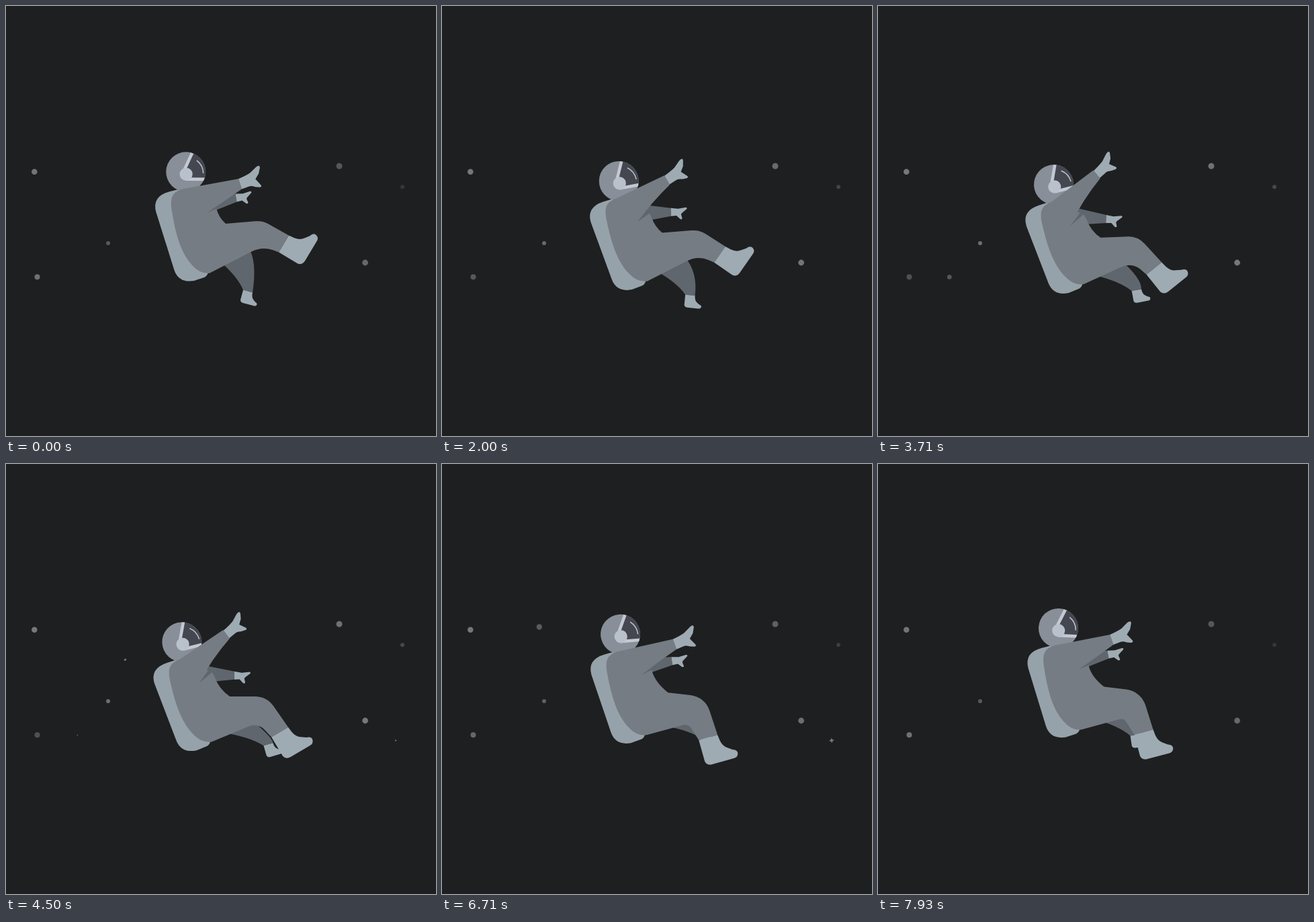
These frames come from a looping animation (640x640 px, 8000 ms). An HTML page with a canvas:

```html
<!DOCTYPE html>
<html lang="en">
<head>
<meta charset="utf-8">
<title>Floating astronaut</title>
<style>
  html, body { margin: 0; width: 100%; height: 100%; overflow: hidden; background: #1e1f20; }
  canvas { display: block; width: 100vw; height: 100vh; }
</style>
</head>
<body>
<canvas id="stage" width="640" height="640"></canvas>
<script>
const ctx = document.getElementById('stage').getContext('2d');
const LOOP = 8000;
const RAD = Math.PI / 180;
const SUIT = '#767c84', DARK = '#60666d', TRIM = '#9eabb3', PACK = '#96a2a9';

const HAND = new Path2D('M0-8Q12-9 19-11L30-16.5Q37-19 35.5-14L31-6 24 0 29 11Q30 14.5 26 13.5L20 11Q15 7 11 7.5L0 8Z');
const SMALL_HAND = new Path2D('M0-6L11-4.5 22-6Q25-6 23.5-3.5L16.5 2 15 4 16.5 10Q16 12 13.5 11L8 5.5 0 6Z');
const BOOT = new Path2D('M0-14.5L9-15.5Q18-17 22-23L27-30Q29.5-37.5 35-36Q40.5-34 40-28.5L40 5Q40 13 33 14.5L0 14.5Z');
const BACKPACK = new Path2D('M258 273L243 277Q217 284 223 307L250.5 393Q257 413 280 409.5L296 404Q301 401 301 396L280 300Z');
const VISOR = new Path2D('M-2 0L10-30 40-30 40 11 0 11Z');
const SPARKLE = new Path2D('M0-1Q.2-.2 1 0Q.2.2 0 1Q-.2.2-1 0Q-.2-.2 0-1Z');

// x, y, radius, opacity, opacity gained while the astronaut sinks
const STARS = [
  [42.3, 246.8, 4.3, 0.38, 0.02], [46.5, 403.3, 4, 0.37, -0.15],
  [152, 353, 3, 0.26, 0.1], [496, 238.3, 4.5, 0.25, 0.12],
  [590, 269.2, 3, 0.11, 0.08], [534.6, 382, 4.4, 0.33, 0.07]
];

const clamp = v => Math.min(1, Math.max(0, v));
const ease = v => { v = clamp(v); return v * v * (3 - 2 * v); };
const pulse = (t, from, to) => Math.sin(Math.PI * clamp((t - from) / (to - from)));
const grey = alpha => `rgba(255,255,255,${alpha})`;
const joint = (x, y, degrees) => ({ x, y, a: degrees * RAD });
const edge = (j, w) => [j.x + Math.sin(j.a) * w, j.y - Math.cos(j.a) * w];

// The body bobs, the arms wave, the back leg swings and the front leg folds once.
function poseAt(t) {
  const sink = 1.7 + 16.4 * Math.cos(2 * Math.PI * (t - 3800) / 14000);
  const raise = Math.cos(Math.PI * (t - 3680) / 7600) ** 2;
  const swing = Math.sin(Math.PI * t / 11400) ** 2;
  const drop = ease((t - 1200) / 6000);
  const bend = drop ** 0.8;
  return {
    sink, raise, swing, bend,
    tilt: (0.2 - 0.2 * sink) * RAD,
    nod: -0.62 * sink * RAD,
    frontHand: joint(348.5 - 23 * raise, 265.5 - 33 * raise + sink, -18 - 21.5 * raise),
    backHand: joint(342.5 - 3 * raise, 286 + 13 * raise + sink, -10 + 13 * raise),
    frontFoot: joint(413.5 - 18 * drop * drop, 354.5 + 47.5 * drop + sink, 31 + 44 * bend),
    backFoot: joint(360 + 34 * swing, 425 - 28 * swing + sink, 105 - 35 * swing)
  };
}

function inSpace(transform, draw) {
  ctx.save();
  transform();
  draw();
  ctx.restore();
}

function stamp(path, color, j, sx = 1, sy = sx) {
  inSpace(() => { ctx.translate(j.x, j.y); ctx.rotate(j.a); ctx.scale(sx, sy); }, () => {
    ctx.fillStyle = color;
    ctx.fill(path);
  });
}

function fillShape(color, trace) {
  ctx.fillStyle = color;
  ctx.beginPath();
  trace();
  ctx.fill();
}

function stroke(color, width, trace) {
  ctx.strokeStyle = color;
  ctx.lineWidth = width;
  ctx.beginPath();
  trace();
  ctx.stroke();
}

const disc = (x, y, r, color) => fillShape(color, () => ctx.arc(x, y, r, 0, 2 * Math.PI));

function drawSky(t, sink) {
  const low = clamp(sink / 18);
  for (const [x, y, r, alpha, gain] of STARS) disc(x, y, r, grey(alpha + gain * low));
  disc(106.3, 403.4, 3.3 * pulse(t, 2740, 4690), grey(0.25));
  disc(144.8, 242.5, 4.2 * pulse(t, 5450, 7770), grey(0.27));
  stamp(SPARKLE, grey(0.38), joint(580, 411.5, -6), 10 * pulse(t, 4350, 7050) + 1e-4);
  drawShootingStar(ease((t - 4620) / 1500), ease((t - 4400) / 1550));
}

function drawShootingStar(tail, head) {
  if (head <= 0 || tail >= 1) return;
  const steps = 12;
  ctx.lineCap = 'round';
  stroke(grey(0.4), 2.6, () => {
    for (let i = 0; i <= steps; i++) {
      const u = tail + (head - tail) * i / steps, v = 1 - u;
      ctx.lineTo(178 * v * v + 264 * u * v + 97 * u * u, 291 * v * v + 626 * u * v + 354 * u * u);
    }
  });
  ctx.lineCap = 'butt';
}

function drawHelmet(nod) {
  inSpace(() => { ctx.translate(267.2, 247.3); ctx.rotate(nod); }, () => {
    disc(0, 0, 29.5, '#888f99');
    ctx.clip();
    ctx.fillStyle = '#44474f';
    ctx.fill(VISOR);
    stroke('#c3c8d2', 4.6, () => {
      ctx.moveTo(-4, 1); ctx.lineTo(10, -30);
      ctx.moveTo(0, 10.8); ctx.lineTo(32, 10.8);
    });
    stroke('#c3c8d2', 1.5, () => { ctx.moveTo(16, -17); ctx.quadraticCurveTo(25.5, -10, 26, 2); });
    disc(0.4, 3.5, 9.6, '#b9c1cc');
  });
}

function drawAstronaut(pose) {
  const { sink, raise, swing, bend, tilt, nod, frontHand, backHand, frontFoot, backFoot } = pose;
  const toBody = () => {
    ctx.translate(271, 342 + sink);
    ctx.rotate(tilt);
    ctx.translate(-271, -342);
  };
  const body = draw => inSpace(toBody, draw);

  // Back arm and leg
  fillShape(DARK, () => {
    body(() => { ctx.moveTo(300, 309); ctx.lineTo(295, 283); });
    ctx.lineTo(...edge(backHand, 6));
    ctx.lineTo(...edge(backHand, -6));
  });
  stamp(SMALL_HAND, TRIM, backHand);

  fillShape(DARK, () => {
    ctx.moveTo(320, 382 + sink);
    ctx.quadraticCurveTo(345 + 20 * swing, 404 - 17 * swing + sink, ...edge(backFoot, -7.3));
    ctx.lineTo(...edge(backFoot, 7.3));
    ctx.quadraticCurveTo(374 + 25 * swing, 380 + 10 * swing + sink, 361, 360 + sink);
  });
  stamp(BOOT, TRIM, backFoot, 0.47, 0.5);

  body(() => {
    ctx.fillStyle = PACK;
    ctx.fill(BACKPACK);
    drawHelmet(nod);
  });

  // Torso and front leg are one outline
  const fold = bend * bend;
  fillShape(SUIT, () => {
    body(() => { ctx.moveTo(262, 273); ctx.lineTo(309, 294); ctx.lineTo(313, 302); });
    ctx.quadraticCurveTo(317, 316 + 3 * bend + sink, 327 + 9.5 * bend, 324.5 + 10 * fold + sink);
    ctx.arcTo(382 + 9.5 * bend, 320 + 21 * fold + sink, ...edge(frontFoot, 14.5), 34);
    ctx.lineTo(...edge(frontFoot, 14.5));
    ctx.lineTo(...edge(frontFoot, -14.5));
    ctx.arcTo(381 - 15 * fold, 358 + 23 * fold + sink, 304, 398 + sink, 40 - 30 * bend);
    body(() => {
      ctx.lineTo(303, 398);
      ctx.quadraticCurveTo(288, 399, 277, 386);
      ctx.bezierCurveTo(257, 365, 250.5, 328, 246.5, 305);
      ctx.bezierCurveTo(243.5, 285, 247, 278, 262, 273);
    });
  });
  stamp(BOOT, TRIM, frontFoot);

  // Armpit shadow and front arm
  const pit = [299 - 11 * raise, 308 + 2 * raise];
  fillShape(DARK, () => body(() => {
    ctx.moveTo(...pit);
    ctx.lineTo(313 - 4 * raise, 302 - 8 * raise);
    ctx.lineTo(307, 288);
  }));
  fillShape(SUIT, () => {
    body(() => { ctx.moveTo(...pit); ctx.lineTo(262, 273); });
    ctx.lineTo(...edge(frontHand, 8));
    ctx.lineTo(...edge(frontHand, -8));
    body(() => ctx.quadraticCurveTo(325 - 17 * raise, 290.5 - 17 * raise, ...pit));
  });
  stamp(HAND, TRIM, frontHand, 1, 1 - 0.12 * raise);
}

function render(now) {
  const t = now % LOOP;
  const pose = poseAt(t);
  ctx.fillStyle = '#1e1f20';
  ctx.fillRect(0, 0, 640, 640);
  drawSky(t, pose.sink);
  drawAstronaut(pose);
}

let start;
function tick(now) {
  start ??= now;
  render(now - start);
  requestAnimationFrame(tick);
}
render(0);
requestAnimationFrame(tick);
</script>
</body>
</html>
```
